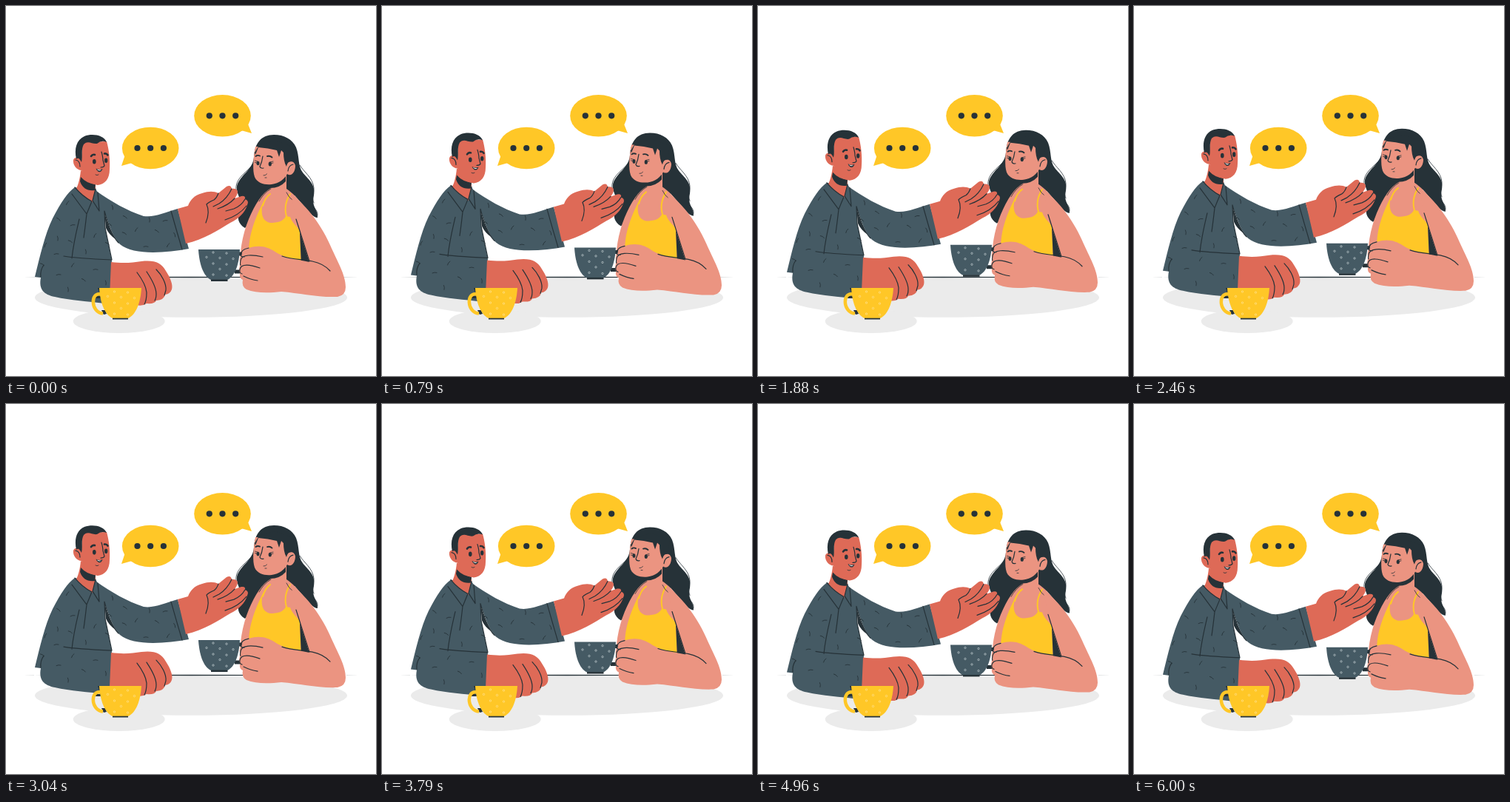
Animation, 500 px wide and 500 px high, one loop 6.04 s. Source, as an HTML page:

```html
<!DOCTYPE html>
<html lang="en">
<head>
<meta charset="utf-8">
<title>Talking over coffee</title>
<style>
html, body { margin: 0; width: 100%; height: 100%; overflow: hidden; background: #fff; }
svg { display: block; width: 100vw; height: 100vh; }
.ink { fill: #263238; }
.shirt { fill: #455a64; }
.sun { fill: #ffc727; }
.him { fill: #de6a57; }
.her { fill: #eb9481; }
.grey { fill: #ebebeb; }
.line { fill: none; stroke: #263238; stroke-width: 1.2; stroke-linecap: round; stroke-linejoin: round; }
.thin { stroke-width: .8; }
.brow { stroke-width: 2.6; }
.strap { fill: none; stroke: #ffc727; stroke-width: 2; stroke-linecap: round; }
.ring { fill: none; stroke-width: .8; }
</style>
</head>
<body>
<svg viewBox="0 0 500 500">
  <ellipse class="grey" cx="250" cy="394" rx="211" ry="26.7"/>
  <ellipse class="grey" cx="152.700" cy="426" rx="62" ry="16"/>
  <path class="ink" d="M24 366.500Q250 365 476 366.500Q250 368 24 366.500Z"/>

  <g id="bubbles">
    <path class="sun" d="M161 201L156 216L174 211Z"/>
    <ellipse class="sun" cx="195.200" cy="192" rx="38.300" ry="28.300"/>
    <path class="sun" d="M326 157L332 172L314 167Z"/>
    <ellipse class="sun" cx="292.500" cy="148.300" rx="38.300" ry="28.300"/>
  </g>

  <g id="pair">
    <!-- woman: hair and torso -->
    <path class="ink" d="M362 174C345 174 336 185 335 204C334 220 319 227 313 240C308 252 321 261 316 275C312 286 313 294 323 300L350 270L390 256L412 281Q417 286 421 286C422 275 412 271 416 256C419 241 408 234 401 225C394 216 397 204 392 191C387 180 376 174 362 174Z"/>
    <path class="line thin" d="M332 216C324 226 309 233 311 249M397 215C402 224 415 232 416 246C416 253 413 258 416 266M413 270Q422 276 421 283"/>
    <path class="her" d="M358 236L358 246C346 253 337 267 328 288C319 310 315 334 316 362L345 378L410 370L420 300C409 281 396 258 379 247L379 226Z"/>
    <path class="ink" d="M353 240Q368 239 378 229L378 237Q370 246 357 246L358 241Z"/>
    <path class="sun" d="M348 264C343 279 346 291 357 293C367 293 375 291 378 284L384 285C387 294 394 298 397 304L399 350L329 338C326 315 335 290 348 264Z"/>
    <path class="strap" d="M347 270Q350 259 357 254M380 287C375 274 379 262 384 254"/>
    <path class="line thin" d="M358 247C351 251 346 257 342 264M388 263Q382 259 379 252"/>

    <!-- woman: head -->
    <path class="her" d="M337 190C334 207 333 222 336 231C340 240 350 242 359 241C369 240 377 233 380 227C386 231 391 224 391 216C390 209 383 209 379 213L377 190Z"/>
    <path class="ink" d="M336 198L342 188L364 182L389 191L386 210C382 209 380 213 379 217C376 212 375 205 375 198L372 195L369 204L366 195Q354 192 341 191L337 201Z"/>
    <path class="line" d="M381 223Q382 215 388 214M347 203Q346 211 343 217Q344 220 348 219"/>
    <path class="line" style="stroke-width:1.9" d="M337.500 203Q340 201 343 202.500M353 203Q357 202 359.500 204.500"/>
    <ellipse class="ink" cx="340.500" cy="212.500" rx="2" ry="2.800"/>
    <ellipse class="ink" cx="356.800" cy="213.500" rx="2.100" ry="2.900"/>
    <path class="line thin" d="M340 210L336.500 209M339 212L336.500 211.500M357 211L361 210M358 213L361 212M348 229Q350.500 229.500 352.500 227M350 232H352"/>

    <!-- held cup -->
    <path d="M309 335H324M309 359H324" stroke="#263238" stroke-width="5"/>
    <path class="shirt" d="M260 329H316C315 348 310 365 299 370H277C266 365 261 347 260 329Z"/>
    <path class="ink" d="M277 369.500H299.500V372H277Z"/>
    <g id="darkDots" class="ring" stroke="#b4c0c5"></g>

    <!-- woman: near arm -->
    <path class="ink" d="M391 286L397 305L399 350H411Z"/>
    <path class="her" d="M385 254C402 266 424 291 438 323C448 346 459 363 459 380Q459 391 448 393C420 394 398 388 372 386C354 388 337 388 325 383Q318 379 320 370Q315 368 316 361Q314 355 317 349Q314 342 318 337Q318 329 328 327C343 322 354 326 362 331C374 340 390 342 410 346L392 288Z"/>
    <path class="line" d="M392 288L410 345M373 338C388 343 399 342 414 345Q429 348 438 358M328 327Q317 329 318 336Q316 339 322 339M347 339C334 336 318 335 317 344Q316 349 317 350M343 354C331 350 318 347 316 356Q315 361 319 362M340 371C331 370 325 367 321 365"/>

    <!-- man: torso and sleeves -->
    <path class="shirt" d="M93 245C83 252 74 266 63 287C52 310 46 338 39 366L47 367C44 383 51 390 66 393C87 398 112 399 133 402L141 397L143 344L134 300L133 278C140 296 144 313 154 322C172 337 214 334 247 328L232 274C214 279 201 286 186 284C164 277 142 264 122 250Z"/>
    <path class="ink" d="M133 277C136 292 141 304 148 315Q139 309 135 300Z"/>
    <path class="line" d="M99 288C95 305 91 321 89 341M78 338Q95 341 143 343M143 343L134 300L133 277C138 295 143 311 152 320M223 277Q230 302 238 329M47 366Q46 357 51 350"/>
    <g id="flecks" class="line thin"></g>

    <!-- man: neck and collar -->
    <path class="him" d="M101 222C100 233 98 240 95 247L111 266L117 265L121 251V235Z"/>
    <path class="ink" d="M101 231Q109 240 121 241L120 249Q105 251 100 237Z"/>
    <path class="shirt" d="M93 245L89 254L109 281L116 264Q102 256 93 245ZM121 247L117 263L126 277L124 252Z"/>
    <path class="line" d="M93 245Q103 257 116 264L109 281L89 254M121 247L117 263L126 277L124 252M109 281Q107 299 105 313"/>

    <!-- man: head -->
    <path class="him" d="M103 184L136 183C139 193 141 209 140 221C140 233 134 241 124 242C113 241 105 233 102 222C96 222 90 215 91 208C93 203 99 204 102 209Z"/>
    <path class="ink" d="M95 207C92 193 95 181 106 176C116 172 132 174 136 184Q129 181 123 186C116 187 111 181 105 187C101 194 104 203 102 211Q98 203 95 207Z"/>
    <path class="line" d="M94 208Q100 209 100 217M129 197Q131 204 131 208L133 216Q132 218 128 218"/>
    <path class="line brow" d="M115 203Q117 200 120 201M133 199.500Q136 199 137.500 201.500"/>
    <ellipse class="ink" cx="119.300" cy="210.300" rx="2.300" ry="3.300"/>
    <ellipse class="ink" cx="135.200" cy="208.800" rx="2.200" ry="3.300"/>
    <path class="ink" d="M121.500 219.500Q126 222 130.500 220Q129 225 125 224Q122 222 121.500 219.500Z"/>
    <path d="M122.500 220.500Q126 222 129 221.500Q126 224 122.500 220.500Z" fill="#fff"/>
    <path class="line thin" d="M121 228Q123 229.500 125 228"/>

    <!-- man: reaching hand -->
    <path class="him" d="M232 274L246 270C249 262 254 256 265 253C274 250 281 250 287 253L298 244Q304 241 305 247Q312 246 313 251Q313 255 309 260L318 257Q324 256 323 261Q329 263 326 269C323 279 315 287 303 293C288 302 267 316 243 321Z"/>
    <path class="line" d="M287 253Q285 259 281 262Q274 265 271 268Q276 278 270 293M305 247Q299 260 288 267L280 271M309 260Q301 269 286 274M323 261Q318 270 308 274L297 277M325 270Q315 283 296 289"/>

    <!-- man: resting hand -->
    <path class="him" d="M142 346C158 348 171 347 183 345C201 343 210 347 216 358C222 367 226 377 224 383Q222 389 215 390Q214 397 203 398Q201 403 190 402Q184 406 176 404L140 392Z"/>
    <path class="line" d="M177 360C183 368 189 377 190 387Q190 398 187 403M190 359C196 368 203 379 203 389Q203 395 201 398M203 356C210 363 217 375 216 384L214 391"/>
  </g>

  <!-- table cup -->
  <path class="ink" d="M124 381H127L132 398L129 397ZM120 392H128L129 395H120ZM129 411L134 411L136 416L132 417Z"/>
  <path d="M128 389.500C114 386 114 414 131 415.500" fill="none" stroke="#ffc727" stroke-width="4.500"/>
  <path class="sun" d="M126 381H183C182 400 176 417 165 422H144C133 417 127 400 126 381Z"/>
  <path class="ink" d="M144 421.700H165V423.500H144Z"/>
  <g id="sunDots" class="ring" stroke="#ffe08a"></g>
</svg>
<script>
const el = id => document.getElementById(id);
const circle = (x, y, r, cls = '') => `<circle class="${cls}" cx="${x}" cy="${y}" r="${r}"/>`;

el('bubbles').innerHTML += [[195.2, 192], [292.5, 148.3]].map(([x, y]) =>
  [-17.700, 0, 17.700].map(d => circle(x + d, y, 4.1, 'ink')).join('')).join('');

// Staggered rings that narrow with the bowl
function rings(cx, top) {
  let out = '';
  for (let row = 0; row < 5; row++) {
    const half = 25 - row * row * .9;
    for (let i = -3; i <= 3; i++) {
      const x = i * 18 + (row % 2) * 9 - 8;
      if (Math.abs(x) < half) out += circle(cx + x, top + row * 7.500 + i * 1.100, 1.2);
    }
  }
  return out;
}
el('darkDots').innerHTML = rings(288, 333);
el('sunDots').innerHTML = rings(154.5, 386);

// x, y, angle
const flecks = [
  [83, 266, -60], [71, 288, 35], [90, 296, -15], [70, 314, 80], [53, 323, -70],
  [87, 318, 25], [108, 332, 80], [120, 310, -65], [68, 335, -10], [49, 349, 25],
  [71, 363, -10], [90, 350, -60], [105, 370, 30], [121, 356, -5], [84, 383, 80],
  [135, 374, 80], [144, 272, 75], [161, 285, 30], [140, 295, 25], [160, 307, 25],
  [176, 302, -60], [194, 289, 80], [215, 290, -15], [204, 304, 30], [189, 325, -5],
  [219, 323, -60], [228, 309, 65], [137, 321, 30]
];
el('flecks').innerHTML = flecks.map(([x, y, a]) =>
  `<path transform="translate(${x} ${y}) rotate(${a})" d="M-3 0Q0 -1 3 .5"/>`).join('');

const LOOP = 6040, RISE = 10, start = performance.now();
function draw(now) {
  const phase = Math.max(0, now - start) % LOOP / LOOP;
  const lift = RISE * (1 - Math.abs(2 * phase - 1));
  el('pair').setAttribute('transform', `translate(0 ${-lift})`);
  requestAnimationFrame(draw);
}
draw(start);
</script>
</body>
</html>
```
